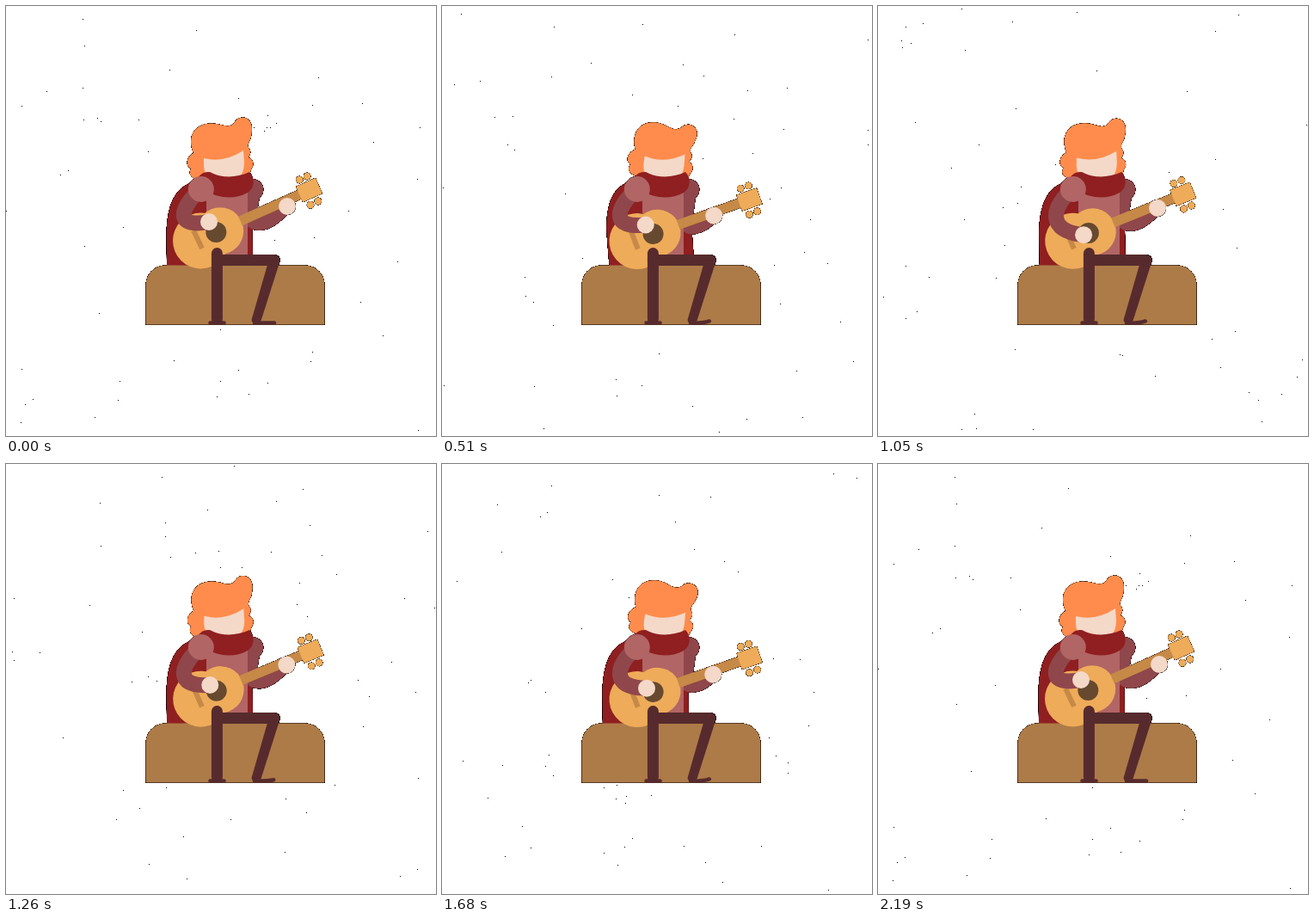
Write an HTML page that moves like this. It is 500 px wide and 500 px high and loops after 2280 ms.

```html
<!DOCTYPE html>
<html lang="en">
<head>
<meta charset="utf-8">
<title>Guitar player in the snow</title>
<style>
  html, body { margin: 0; width: 100%; height: 100%; overflow: hidden; background: #fff; }
  svg { display: block; width: 100vw; height: 100vh; }
  .limb { fill: none; stroke-linecap: round; stroke-linejoin: round; }
  .sleeve { stroke: #8f474b; stroke-width: 18; }
  .red { fill: #8f1f20; }
  .rose { fill: #b16564; }
  .skin { fill: #f4d8c8; }
  .wood { fill: #eeab59; }
  .leg { stroke: #572b2d; }
</style>
</head>
<body>
<svg viewBox="0 0 500 500">
  <defs>
    <!-- dark rim along the soft outer edge -->
    <filter id="rim" filterUnits="userSpaceOnUse" x="0" y="0" width="500" height="500" color-interpolation-filters="sRGB">
      <feComponentTransfer in="SourceAlpha" result="solid">
        <feFuncA type="linear" slope="12" intercept="-1"/>
      </feComponentTransfer>
      <feMerge><feMergeNode in="solid"/><feMergeNode in="SourceGraphic"/></feMerge>
    </filter>
  </defs>
  <path id="snow" shape-rendering="crispEdges"/>
  <g filter="url(#rim)">
    <path id="cape" class="red"/>
    <path fill="#ad7b48" d="M162.6 370.4V324A22.5 22.5 0 0 1 185 301.6H348A22.5 22.5 0 0 1 370.4 324V370.4Z"/>
    <circle cx="287" cy="213.5" r="12.3" fill="#8f474b"/>
    <path id="farArm" class="limb sleeve"/>
    <path class="rose" d="M233 208H281V291H233Z"/>

    <g id="head">
      <path id="hair" fill="#ff8c4c"/>
      <path class="skin" d="M230 177Q253 183 276 168L277 182Q277 205 254 205Q231 205 230 186Z"/>
    </g>
    <path class="red" d="M221 205C224 194 234 191 240 194.5C252 200 268 200 283 193C290 200 289 212 281 217C265 226 245 223 234 215Z"/>

    <g id="guitar">
      <circle class="wood" cx="226.5" cy="273" r="32.5"/>
      <circle class="wood" cx="249" cy="261.500" r="27.2"/>
      <circle cx="244.3" cy="263" r="12" fill="#66492f"/>
      <path d="M218 261L228 282" stroke="#c68947" stroke-width="6"/>
      <path d="M272.5 250L343 218.5" stroke="#c68947" stroke-width="11.5"/>
      <g class="wood">
        <circle cx="341.3" cy="202" r="4.2"/><circle cx="350.2" cy="198" r="4.2"/>
        <circle cx="354" cy="231.2" r="4.2"/><circle cx="362.8" cy="227" r="4.2"/>
        <rect x="340" y="204" width="25" height="20" transform="rotate(-24 352.5 214)"/>
      </g>
    </g>

    <circle id="farHand" class="skin" r="10"/>
    <path id="nearArm" class="limb sleeve"/>
    <circle class="rose" cx="226.8" cy="213" r="15"/>
    <circle id="nearHand" class="skin" r="10"/>

    <g class="limb leg">
      <path d="M245.4 295.5H312.2" stroke-width="13"/>
      <path d="M245.4 287.5V364" stroke-width="13"/>
      <path d="M237.5 368.5H253.5" stroke-width="4.5"/>
      <path id="toe" stroke-width="4.5"/>
    </g>
    <path fill="#572b2d" d="M306 294L285.5 365Q286 370.5 294 370L296.5 366L318.5 297Z"/>
  </g>
</svg>
<script>
const STEP = 30, LOOP = 2280, RESET = 2190;
const $ = id => document.getElementById(id);
const set = (id, attrs) => {
  for (const k in attrs) $(id).setAttribute(k, attrs[k]);
};

// [time, amount]
const LEAN = [[0, 0], [510, .9], [620, .97], [1050, .16], [1220, .03],
  [1440, .3], [1680, .98], [1790, 1.05], [1950, .92], [2190, .4]];
const NECK = [[0, 0], [510, .97], [620, 1], [1050, .42], [1220, .32],
  [1440, .48], [1680, 1], [1790, 1.05], [1950, .95], [2190, .55]];
const SWAY = [[0, 0], [250, .5], [510, 1], [800, .6], [1050, .12], [1300, 0], [2190, 0]];

function slope(keys, i) {
  const a = keys[i - 1], b = keys[i + 1];
  return a && b ? (b[1] - a[1]) / (b[0] - a[0]) : 0;
}

// smooth curve through the keys
function curve(keys, t) {
  let i = 0;
  while (i < keys.length - 2 && t > keys[i + 1][0]) i++;
  const [t0, a] = keys[i], [t1, b] = keys[i + 1];
  const d = t1 - t0, u = (t - t0) / d, w = 1 - u;
  return a * (1 + 2 * u) * w * w + b * u * u * (3 - 2 * u)
    + d * (slope(keys, i) * u * w * w - slope(keys, i + 1) * u * u * w);
}

const wave = (t, period) => (1 - Math.cos(2 * Math.PI * t / period)) / 2;

function random(seed) {
  return () => {
    seed = (seed + 0x6D2B79F5) | 0;
    let x = Math.imul(seed ^ (seed >>> 15), 1 | seed);
    x ^= x + Math.imul(x ^ (x >>> 7), 61 | x);
    return ((x ^ (x >>> 14)) >>> 0) / 4294967296;
  };
}

function flakes(tick) {
  const rnd = random(tick * 977 + 41);
  const count = 42 + Math.floor(rnd() * 22);
  let d = "";
  for (let i = 0; i < count; i++) {
    d += `M${Math.floor(rnd() * 500)} ${Math.floor(rnd() * 497)}h1v1h-1z`;
  }
  return d;
}

function drawBody(t) {
  const c = curve(SWAY, t);
  set("cape", { d: `M215 205.5C${194 + 2 * c} 213 ${187 + 3 * c} 236 ${186.6 + 5 * c} 266
    L${187 + 7.5 * c} 302H${287 + 6.5 * c}L${286.6 + 4 * c} 262V216L250 204Z` });
  const lift = 3 * wave(t, 390);
  set("toe", { d: `M289 368.5Q303 ${368.5 + lift / 3} ${312 - lift * .6} ${368.5 - lift}` });
}

function drawHead(v) {
  set("head", { transform: `rotate(${9.5 * v} 250 214)` });
  const x = v, y = 4 * v; // the tuft drops as the head leans
  set("hair", { d: `M218 171C210 152 219 137 238 136.5
    C250 136 256 ${142 + y / 2} ${263 + x} ${138 + y / 2}
    C${267 + x} ${135 + y} ${267 + x} ${130 + y} ${275 + x} ${129.5 + y}
    C${287 + x} ${130 + y} ${287 + x} ${143 + y} 285 152
    C284 158 279 161 283 166C286 170 283 174 282 176
    C288 178 289 185 285 190C284 196 281 199 276 200
    L222 201C214 200 212 194 215 189C208 186 210 175 218 171Z` });
}

function drawArms(t, v) {
  const x = 327 - 12 * v, y = 233 + 12 * v;
  set("farHand", { cx: x, cy: y });
  set("farArm", { d: `M287 214L283 ${240 + 4 * v}
    Q${284 - v} ${253 + 5 * v} ${296 - 4 * v} ${252 + 5 * v}
    Q${308 - 4 * v} ${251 + 4 * v} ${x - 3} ${y}` });
  const s = wave(t, 448), hx = 236 + 4 * s, hy = 251 + 19.5 * s;
  set("nearHand", { cx: hx, cy: hy });
  set("nearArm", { d: `M223 216C201 ${238 - 2 * s} 198 ${258 + 4 * s} ${hx - 1} ${hy}` });
}

function draw(time) {
  let t = Math.floor((time % LOOP) / STEP) * STEP;
  if (t >= RESET) t = 0;
  const lean = curve(LEAN, t), neck = curve(NECK, t);
  set("snow", { d: flakes(t / STEP) });
  drawBody(t);
  drawHead(lean);
  set("guitar", {
    transform: `translate(${neck * .9} ${neck * 1.3}) rotate(${4.8 * neck} 235 268)`
  });
  drawArms(t, lean);
}

const start = performance.now();
function frame() {
  draw(performance.now() - start);
  requestAnimationFrame(frame);
}
frame();
</script>
</body>
</html>
```
